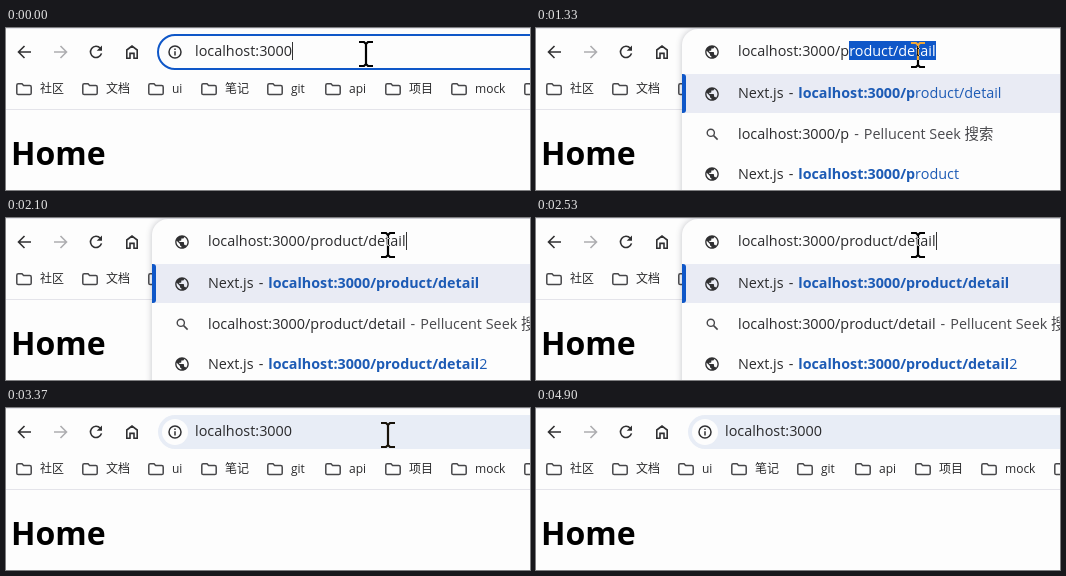
Animation of 524 by 162 pixels, one loop 4930 ms. Source, as an HTML page:

```html
<!DOCTYPE html>
<html lang="zh">
<head>
<meta charset="utf-8">
<title>Address bar</title>
<style>
html, body { margin: 0; width: 100%; height: 100%; overflow: hidden; background: #fdfdfd; }
#stage {
  position: relative; width: 524px; height: 162px; overflow: hidden; isolation: isolate;
  color: #2a2a2c; background: #fdfdfd;
  font: 14.4px/20px "Open Sans", "Noto Sans CJK SC", "Noto Sans CJK", sans-serif;
}
#stage div, #stage svg { position: absolute; white-space: pre; }
svg { left: 0; top: 0; width: 524px; height: 162px; }
b { font-size: 14.3px; }
.line { left: 0; width: 524px; height: 1px; background: #e4e4ea; }
.marks span { position: absolute; top: 51px; font-size: 12px; }
.title { left: 5px; top: 103px; font-weight: 700; font-size: 32px; line-height: 44px; color: #000; }

.pill { left: 152px; top: 7px; width: 400px; height: 34px; border-radius: 17px; background: #e8edf6; }
.focus .pill { box-sizing: border-box; top: 6px; left: 151px; height: 36px; border-radius: 18px; border: 2px solid #0f57c8; background: #fdfdfd; }
.halo { left: 156px; top: 11px; width: 26px; height: 26px; border-radius: 50%; background: #fdfdfd; }
.url { left: 189px; top: 13px; }
.typed { left: 202px; top: 13px; }
.caret { display: inline-block; height: 18px; margin-right: -1px; border-left: 1px solid #333; vertical-align: -4px; }
.sel { background: #0f57c8; color: #fff; }

.panel { left: 146px; top: 1px; width: 400px; height: 180px; border-radius: 16px; background: #fdfdfd; box-shadow: 0 0 6px rgba(60, 64, 80, .3); }
.hot { left: 146px; top: 46px; width: 378px; height: 39px; background: #e9ebf4; }
.hot::before { content: ""; position: absolute; width: 4px; height: 39px; border-radius: 0 3px 3px 0; background: #0f57c8; }
.r1, .r2, .r3 { left: 202px; }
.r1 { top: 55px; } .r2 { top: 96px; } .r3 { top: 136px; }
.link { color: #1d5bb5; }
.dim { color: #48484c; }
.dash { margin: 0 1.3px; }

.focus, .rest, .open, .drop, .slash, .p, .pr, .full { animation: 4930ms step-end infinite; }
.focus { animation-name: focus; }
.rest { animation-name: rest; }
.open { animation-name: open; }
.drop { animation-name: drop; }
.slash { animation-name: slash; }
.p { animation-name: p; }
.pr { animation-name: pr; }
.full { animation-name: full; }
@keyframes focus { 0% { visibility: visible } 16.836%, to { visibility: hidden } }
@keyframes open { 0% { visibility: hidden } 16.836% { visibility: visible } 60.243%, to { visibility: hidden } }
@keyframes slash { 0% { visibility: hidden } 16.836% { visibility: visible } 24.341%, to { visibility: hidden } }
@keyframes drop { 0% { visibility: hidden } 24.341% { visibility: visible } 60.243%, to { visibility: hidden } }
@keyframes p { 0% { visibility: hidden } 24.341% { visibility: visible } 28.398%, to { visibility: hidden } }
@keyframes pr { 0% { visibility: hidden } 28.398% { visibility: visible } 42.596%, to { visibility: hidden } }
@keyframes full { 0% { visibility: hidden } 42.596% { visibility: visible } 60.243%, to { visibility: hidden } }
@keyframes rest { 0% { visibility: hidden } 60.243%, to { visibility: visible } }

/* The pointer inverts whatever lies under it. */
.invert { mix-blend-mode: difference; }
.mouse { animation: move 4930ms infinite, leave 4930ms step-end infinite; }
@keyframes move {
  0%, .609% { transform: translate(360px, 26px); animation-timing-function: ease-in-out }
  10.751%, to { transform: translate(382px, 27px) }
}
@keyframes leave { 0% { visibility: visible } 81.745%, to { visibility: hidden } }
</style>
</head>
<body>
<div id="stage">
  <svg>
    <defs>
      <path id="folder" d="M.8 2.2Q.8.8 2.2.8H6L7.6 2.6H13.8Q15.2 2.6 15.2 4V10.2Q15.2 11.6 13.8 11.6H2.2Q.8 11.6.8 10.2Z" fill="none" stroke="#47474a" stroke-width="1.5"/>
      <path id="globe" transform="scale(.68) translate(-12 -12)" fill="#303032" d="M12 2C6.48 2 2 6.48 2 12s4.48 10 10 10 10-4.48 10-10S17.52 2 12 2zm-1 17.93c-3.95-.49-7-3.85-7-7.93 0-.62.08-1.21.21-1.79L9 15v1c0 1.1.9 2 2 2v1.93zm6.9-2.54c-.26-.81-1-1.39-1.9-1.39h-1v-3c0-.55-.45-1-1-1H8v-2h2c.55 0 1-.45 1-1V7h2c1.1 0 2-.9 2-2v-.41c2.93 1.19 5 4.06 5 7.41 0 2.08-.8 3.97-2.1 5.39z"/>
      <g id="info" fill="none" stroke="#303032" stroke-width="1.5">
        <circle r="6"/><path d="M0-.8V3.4M0-3.4V-1.9"/>
      </g>
    </defs>
  </svg>

  <div class="line" style="top:0"></div>
  <div class="line" style="top:81px"></div>
  <svg fill="none" stroke="#303032" stroke-width="1.6">
    <path d="M25 24H13M18.5 18L12.5 24L18.5 30"/>
    <path d="M48 24H60M54.5 18L60.5 24L54.5 30" stroke="#adadb0"/>
    <path d="M94.3 20.2A5.6 5.6 0 1 0 95.5 25.4"/>
    <path d="M96 17.5V22.8H90.7Z" fill="#303032" stroke="none"/>
    <path d="M120.8 22L126 18L131.2 22V30.2H128V25.4H124V30.2H120.8Z"/>
    <use href="#folder" x="10" y="55"/><use href="#folder" x="76" y="55"/>
    <use href="#folder" x="142" y="55"/><use href="#folder" x="195" y="55"/>
    <use href="#folder" x="261" y="55"/><use href="#folder" x="319" y="55"/>
    <use href="#folder" x="379" y="55"/><use href="#folder" x="445" y="55"/>
    <use href="#folder" x="518" y="55"/>
  </svg>
  <div class="marks">
    <span style="left:34px">社区</span><span style="left:100px">文档</span>
    <span style="left:166px">ui</span><span style="left:219px">笔记</span>
    <span style="left:285px">git</span><span style="left:343px">api</span>
    <span style="left:403px">项目</span><span style="left:469px">mock</span>
  </div>
  <div class="title">Home</div>

  <div class="focus">
    <div class="pill"></div>
    <svg><use href="#info" x="169" y="24"/></svg>
    <div class="url">localhost:3000<span class="caret"></span></div>
  </div>

  <div class="rest">
    <div class="pill"></div>
    <div class="halo"></div>
    <svg><use href="#info" x="169" y="24"/></svg>
    <div class="url">localhost:3000</div>
  </div>

  <div class="drop">
    <div class="panel"></div>
    <div class="hot"></div>
    <svg>
      <use href="#globe" x="176" y="66"/><use href="#globe" x="176" y="146"/>
      <path d="M177.6 107.6L181.6 111.6" stroke="#47474a" stroke-width="1.6"/>
      <circle cx="174.8" cy="104.8" r="3.6" fill="none" stroke="#47474a" stroke-width="1.4"/>
    </svg>
  </div>
  <svg class="open"><use href="#globe" x="176" y="24"/></svg>

  <div class="slash"><div class="typed">localhost:3000/<span class="caret"></span></div></div>

  <div class="p">
    <div class="typed">localhost:3000/p<span class="sel">roduct/detail</span></div>
    <div class="r1">Next.js<span class="dash"> - </span><span class="link"><b>localhost:3000/p</b>roduct/detail</span></div>
    <div class="r2">localhost:3000/p<span class="dim"><span class="dash"> - </span>Pellucent Seek 搜索</span></div>
    <div class="r3">Next.js<span class="dash"> - </span><span class="link"><b>localhost:3000/p</b>roduct</span></div>
  </div>

  <div class="pr">
    <div class="typed">localhost:3000/pr<span class="sel">oduct/detail</span></div>
    <div class="r1">Next.js<span class="dash"> - </span><span class="link"><b>localhost:3000/pr</b>oduct/detail</span></div>
    <div class="r2">localhost:3000/pr<span class="dim"><span class="dash"> - </span>Pellucent Seek 搜索</span></div>
    <div class="r3">Next.js<span class="dash"> - </span><span class="link"><b>localhost:3000/pr</b>oduct</span></div>
  </div>

  <div class="full">
    <div class="typed">localhost:3000/product/detail<span class="caret"></span></div>
    <div class="r1">Next.js<span class="dash"> - </span><b class="link">localhost:3000/product/detail</b></div>
    <div class="r2">localhost:3000/product/detail<span class="dim"><span class="dash"> - </span>Pellucent Seek 搜索</span></div>
    <div class="r3">Next.js<span class="dash"> - </span><span class="link"><b>localhost:3000/product/detail</b>2</span></div>
  </div>

  <svg class="invert">
    <path class="mouse" d="M-7-12H-2L0-10L2-12H7M0-11V11M-7 12H-2L0 10L2 12H7" fill="none" stroke="#fff" stroke-width="2.2"/>
  </svg>
</div>
</body>
</html>
```
